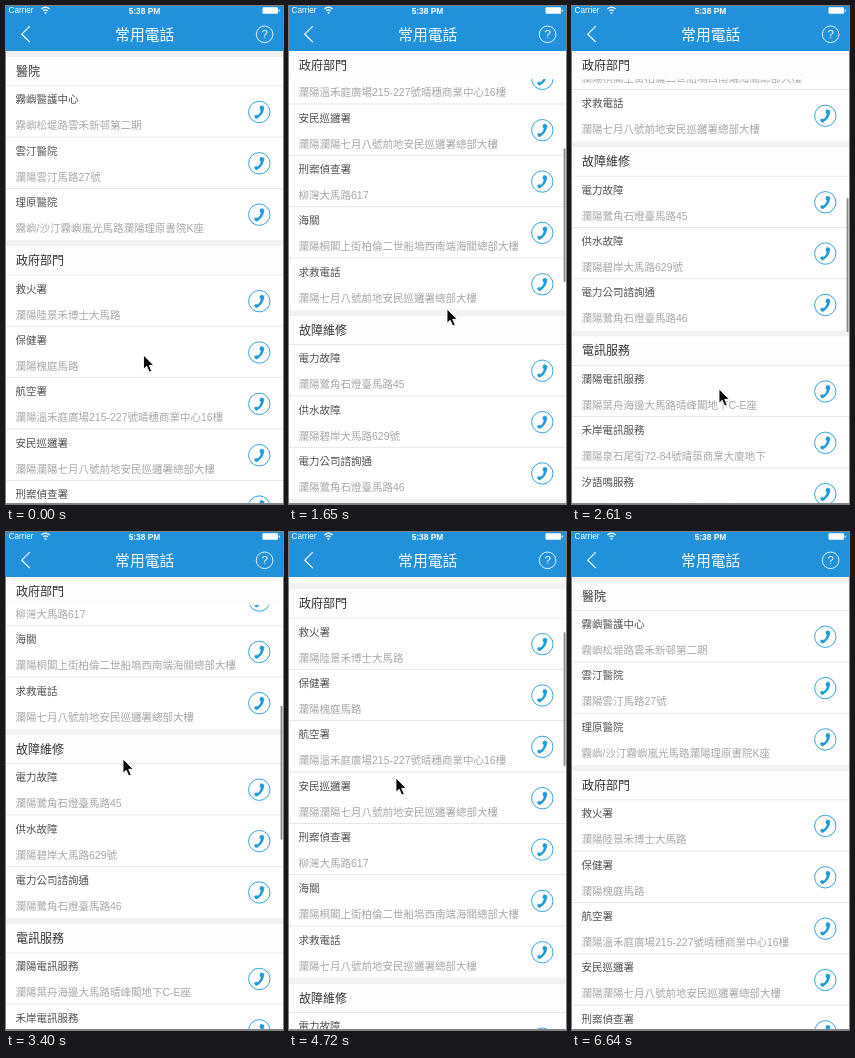
Animation of 277 by 498 pixels, one loop 6840 ms. Source, as an HTML page:

```html
<!DOCTYPE html>
<html lang="zh-Hant">
<head>
<meta charset="utf-8">
<title>常用電話</title>
<style>
html, body { margin: 0; width: 100%; height: 100%; overflow: hidden; background: #fff; }
svg { display: block; width: 100%; height: 100%; }
text { font-family: "Liberation Sans", "Noto Sans CJK TC", "Noto Sans CJK", "Noto Sans CJK HK", sans-serif; }
.head { font-size: 12px; fill: #333; }
.name { font-size: 10.5px; fill: #505050; }
.addr { font-size: 10.5px; fill: #a6a6a6; }
</style>
</head>
<body>
<svg viewBox="0 0 277 498" preserveAspectRatio="none">
  <defs>
    <g id="phone">
      <circle r="10.7" fill="#fff" stroke="#1d9ad9" stroke-width=".9"/>
      <path fill="#1d9ad9" stroke="#1d9ad9" stroke-width=".4" d="M1.6-6.2L4-5.6Q5-5 4.6-3Q3.6 2.5-1.5 6Q-3 7-4 6L-5 4.2Q-4.8 3.2-2.8 3L-1.6 3.6Q1.2 1.4 1.8-1.8L.6-2.8Q.2-5 1.6-6.2Z"/>
    </g>
  </defs>
  <rect width="277" height="498" fill="#fff"/>
  <g id="list"></g>
  <g id="heads"></g>
  <rect id="bar" x="274.6" width="1.9" height="134" rx=".9" fill="#8a8a8a"/>
  <rect width="277" height="45" fill="#2191dc"/>
  <g fill="#fff">
    <text x="2.5" y="7.4" font-size="8.2">Carrier</text>
    <text x="138.5" y="7.5" font-size="8.4" font-weight="bold" text-anchor="middle">5:38 PM</text>
    <text x="138.7" y="33.8" font-size="14.8" font-weight="500" text-anchor="middle">常用電話</text>
    <circle cx="39.5" cy="6.8" r="1"/>
    <rect x="256.5" y="1.3" width="15.5" height="6.4" rx="1.2"/>
    <rect x="272.7" y="3.4" width="1.2" height="2.2" rx=".5"/>
    <text x="258.6" y="32.4" font-size="11.5" text-anchor="middle">?</text>
  </g>
  <g fill="none" stroke="#fff">
    <path d="M37.2 4.8Q39.5 2.8 41.8 4.8M35.4 3Q39.5-.6 43.6 3" stroke-width="1.2"/>
    <path d="M23.8 20.2L15.8 28.2L23.8 36.2" stroke-width="1.2"/>
    <circle cx="258.6" cy="28.3" r="8.3" stroke-width=".9"/>
  </g>
  <rect y="497" width="277" height="1" fill="#858585"/>
  <path id="cursor" d="M0 0V14.2L3.2 11.2L5.7 17L8.2 15.9L5.7 10.3H10.2Z" stroke="#fff" stroke-width=".9" stroke-linejoin="round"/>
</svg>
<script>
const SECTIONS = [
  ['醫院', [
    ['霧嶼醫護中心', '霧嶼松堤路雲禾新邨第二期'],
    ['雲汀醫院', '瀾陽雲汀馬路27號'],
    ['理原醫院', '霧嶼/沙汀霧嶼嵐光馬路瀾陽理原書院K座']]],
  ['政府部門', [
    ['救火署', '瀾陽陸景禾博士大馬路'],
    ['保健署', '瀾陽槐庭馬路'],
    ['航空署', '瀾陽溫禾庭廣場215-227號晴穗商業中心16樓'],
    ['安民巡邏署', '瀾陽瀾陽七月八號前地安民巡邏署總部大樓'],
    ['刑案偵查署', '柳灣大馬路617'],
    ['海關', '瀾陽桐閣上街柏倫二世船塢西南端海關總部大樓'],
    ['求救電話', '瀾陽七月八號前地安民巡邏署總部大樓']]],
  ['故障維修', [
    ['電力故障', '瀾陽鷺角石燈臺馬路45'],
    ['供水故障', '瀾陽碧岸大馬路629號'],
    ['電力公司諮詢通', '瀾陽鷺角石燈臺馬路46']]],
  ['電訊服務', [
    ['瀾陽電訊服務', '瀾陽葉舟海邊大馬路晴峰閣地下C-E座'],
    ['禾岸電訊服務', '瀾陽泉石尾街72-84號晴築商業大廈地下'],
    ['汐語鳴服務', '瀾陽鷺橋大馬路153號晴築大廈地下']]]
];

const TOP = 45, GAP = 6.2, HEAD = 28.95, ROW = 51.35;
const LOOP = 6840, STEP = 87.37, LAST = 76;

// Key poses, one per swipe
const POSES = [
  { at: 0, scroll: 0, x: 137.5, y: 349 },
  { at: 10, scroll: 0, x: 136, y: 418 },
  { at: 19, scroll: 325, x: 158, y: 303 },
  { at: 30, scroll: 493.5, x: 147, y: 383 },
  { at: 39, scroll: 432, x: 117, y: 227 },
  { at: 54, scroll: 183, x: 107, y: 246 },
  { at: 64, scroll: 103, x: 98.5, y: 255 },
  { at: 74, scroll: 1.2, x: 198, y: 467 }
];

const $ = id => document.getElementById(id);
const clamp = v => Math.max(0, Math.min(1, v));
const move = (el, x, y) => el.setAttribute('transform', `translate(${x} ${y})`);

function add(parent, tag, attrs, text) {
  const el = document.createElementNS('http://www.w3.org/2000/svg', tag);
  for (const k in attrs) el.setAttribute(k, attrs[k]);
  if (text) el.textContent = text;
  parent.appendChild(el);
  return el;
}

function addRow(list, [name, addr], y) {
  add(list, 'rect', { y: y - 0.8, width: 277, height: 0.8, fill: '#dfdfdf' });
  add(list, 'text', { class: 'name', x: 9.5, y: y + 17.2 }, name);
  add(list, 'text', { class: 'addr', x: 9.5, y: y + 43.2 }, addr);
  add(list, 'use', { href: '#phone', x: 253.3, y: y + 25.8 });
}

function build() {
  const list = $('list');
  let y = TOP;
  return SECTIONS.map(([title, rows]) => {
    add(list, 'rect', { y, width: 277, height: GAP, fill: '#f2f2f2' });
    const top = y + GAP, first = top + HEAD;
    rows.forEach((row, i) => addRow(list, row, first + i * ROW));
    y = first + rows.length * ROW;
    const el = add($('heads'), 'g', {});
    add(el, 'rect', { width: 277, height: HEAD - 0.8, fill: '#fdfdfd' });
    add(el, 'text', { class: 'head', x: 10, y: 18.8 }, title);
    return { el, top, end: y };
  });
}

// Slope at a pose: harmonic mean of both sides, flat at turning points
function slope(i, key) {
  const [a, b, c] = [POSES[i - 1], POSES[i], POSES[i + 1]];
  if (!a || !c) return 0;
  const m = (b[key] - a[key]) / (b.at - a.at), n = (c[key] - b[key]) / (c.at - b.at);
  return m * n <= 0 ? 0 : 2 * m * n / (m + n);
}

function glide(k, key) {
  const i = Math.max(0, POSES.findLastIndex((p, j) => p.at <= k && j < POSES.length - 1));
  const p = POSES[i], q = POSES[i + 1], w = q.at - p.at;
  const u = clamp((k - p.at) / w), v = 1 - u;
  return p[key] * v * v * (1 + 2 * u) + q[key] * u * u * (3 - 2 * u)
    + w * u * v * (slope(i, key) * v - slope(i + 1, key) * u);
}

const sections = build();

function draw(time) {
  const k = Math.min(LAST, Math.floor((time % LOOP + 20) / STEP));
  const s = glide(k, 'scroll');
  move($('list'), 0, -s);
  for (const { el, top, end } of sections)
    move(el, 0, Math.max(top - s, Math.min(TOP, end - s - HEAD)));
  $('bar').setAttribute('y', TOP + 1 + s * 0.296);
  $('bar').setAttribute('opacity', k > 10 ? clamp((74 - k) / 3) : 0);
  const exit = Math.max(0, k - 74);
  move($('cursor'), glide(k, 'x') + 21 * exit, glide(k, 'y') + 15 * exit);
  $('cursor').setAttribute('visibility', k < LAST ? 'visible' : 'hidden');
}

const start = performance.now();
function tick() {
  draw(performance.now() - start);
  requestAnimationFrame(tick);
}
tick();
</script>
</body>
</html>
```
